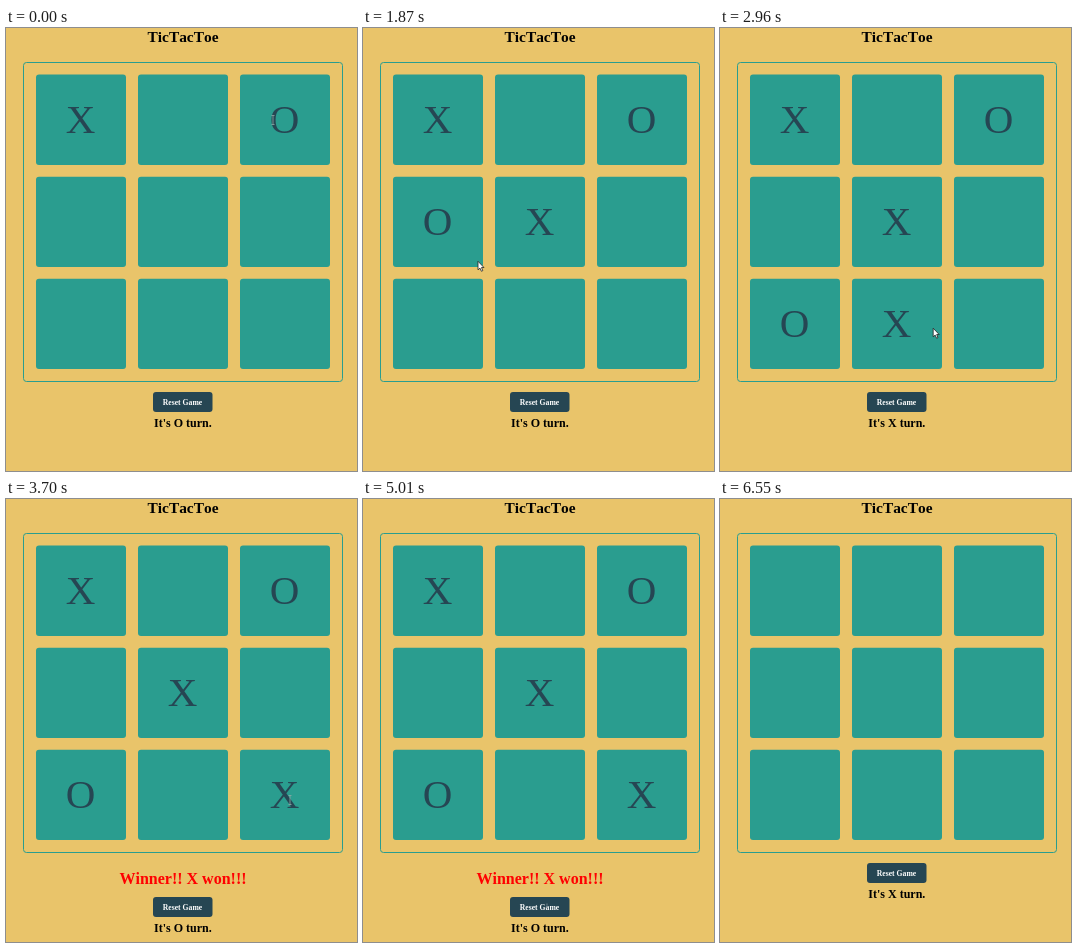
An HTML page with a canvas that plays this animation: 351x443 px, repeating every 7.21 s.

```html
<!DOCTYPE html>
<html lang="en">
<head>
<meta charset="utf-8">
<title>TicTacToe</title>
<style>
html, body { margin: 0; width: 100%; height: 100%; overflow: hidden; background: #e9c46a; }
canvas { display: block; width: 351px; height: 443px; }
</style>
</head>
<body>
<canvas id="stage"></canvas>
<script>
const SAND = '#e9c46a', TEAL = '#2a9d8f', NAVY = '#264653';
const LOOP = 7210, RESET = 5530, WIN = 3700, MID = 177;
const SIZE = 90, TALL = 90.3;

// Clicked cells; X and O alternate
const clicks = [
  { at: 0, cell: 0 }, { at: 390, cell: 2 }, { at: 1510, cell: 4 },
  { at: 2600, cell: 6 }, { at: WIN, cell: 8 }
];

// Pointer strokes: each bends from the last end towards its own
const home = [267, 92];
const strokes = [
  { start: 390, end: 1260, bend: [222, 126], to: [184, 190] },
  { start: 1510, end: 2230, bend: [94, 226], to: [88, 291] },
  { start: 2600, end: 3200, bend: [182, 302], to: [284, 301] },
  { start: 4065, end: 5010, bend: [182, 330], to: [182, 404] },
  { start: 6040, end: 6550, bend: [220, 425], to: [257, 446] }
];

const canvas = document.getElementById('stage');
const ctx = canvas.getContext('2d');
const ratio = window.devicePixelRatio || 1;
canvas.width = 351 * ratio;
canvas.height = 443 * ratio;
ctx.scale(ratio, ratio);
ctx.textAlign = 'center';
ctx.fontKerning = 'none';

const markOf = turn => turn % 2 ? 'O' : 'X';
const inside = ([px, py], x, y, w, h) => px >= x && px < x + w && py >= y && py < y + h;

// The pointer advances in visible jumps of about 130 ms
function pointerAt(t) {
  let from = home;
  for (const { start, end, bend, to } of strokes) {
    if (t < start) break;
    if (t < end) {
      const steps = Math.round((end - start) / 130);
      const p = Math.floor((t - start) / (end - start) * steps) / steps;
      const e = p * p * (3 - 2 * p);
      return from.map((a, i) => (1 - e) ** 2 * a + 2 * e * (1 - e) * bend[i] + e * e * to[i]);
    }
    from = to;
  }
  return from;
}

function box(x, y, w, h, color) {
  ctx.fillStyle = color;
  ctx.beginPath();
  ctx.roundRect(x, y, w, h, 3);
  ctx.fill();
}

function text(value, x, baseline, font, color) {
  ctx.font = `${font} "Liberation Serif", "Times New Roman", serif`;
  ctx.fillStyle = color;
  ctx.fillText(value, x, baseline);
}

const pointers = {
  arrow: { path: 'M0 0V8.6L2 6.9L3.4 10L4.8 9.4L3.5 6.3H6Z', line: '#222', fill: '#fff' },
  hand: { path: 'M1.4 .5H2.6V3H1.4Z', line: NAVY, fill: '#fff' },
  beam: { path: 'M-1.5 -4.5H1.5M0 -4.5V4.5M-1.5 4.5H1.5', line: '#8fa9a6', fill: 'transparent' }
};

function drawPointer(kind, [x, y]) {
  const { path, line, fill } = pointers[kind];
  const shape = new Path2D(path);
  ctx.save();
  ctx.translate(x, y);
  ctx.lineWidth = 0.8;
  ctx.strokeStyle = line;
  ctx.fillStyle = fill;
  ctx.fill(shape);
  ctx.stroke(shape);
  ctx.restore();
}

function draw(t) {
  const played = t < RESET ? clicks.filter(c => c.at <= t) : [];
  const turn = markOf(played.length);
  const won = t >= WIN && t < RESET;
  const shift = won ? 34 : 0;
  const pointer = pointerAt(t);
  let kind = inside(pointer, MID - 30, 364 + shift, 60, 20) ? 'hand' : 'arrow';

  ctx.fillStyle = SAND;
  ctx.fillRect(0, 0, 351, 443);
  text('TicTacToe', MID, 14, 'bold 15.4px', '#000');

  ctx.strokeStyle = TEAL;
  ctx.lineWidth = 1;
  ctx.beginPath();
  ctx.roundRect(17.5, 34.5, 319, 319, 3);
  ctx.stroke();

  for (let i = 0; i < 9; i++) {
    const x = 30 + 102 * (i % 3), y = 46.6 + 102.1 * Math.floor(i / 3);
    const order = played.findIndex(c => c.cell === i);
    box(x, y, SIZE, TALL, TEAL);
    // An empty cell previews the next mark under the pointer
    if (order >= 0 || inside(pointer, x, y, SIZE, TALL)) {
      text(order >= 0 ? markOf(order) : turn, x + 44.5, y + 58.4, '41px', NAVY);
      if (inside(pointer, x + 30, y + 22, 30, 46)) kind = 'beam';
    }
  }

  if (won) text('Winner!! X won!!!', MID, 384.5, 'bold 16px', '#f00');
  box(147, 364 + shift, 59.5, 20, NAVY);
  text('Reset Game', MID - 0.5, 377 + shift, 'bold 7.7px', '#fff');
  text(`It's ${turn} turn.`, MID - 0.2, 399.3 + shift, 'bold 12px', '#000');
  drawPointer(kind, pointer);
}

const start = performance.now();
function frame() {
  draw((performance.now() - start) % LOOP);
  requestAnimationFrame(frame);
}
frame();
</script>
</body>
</html>
```
